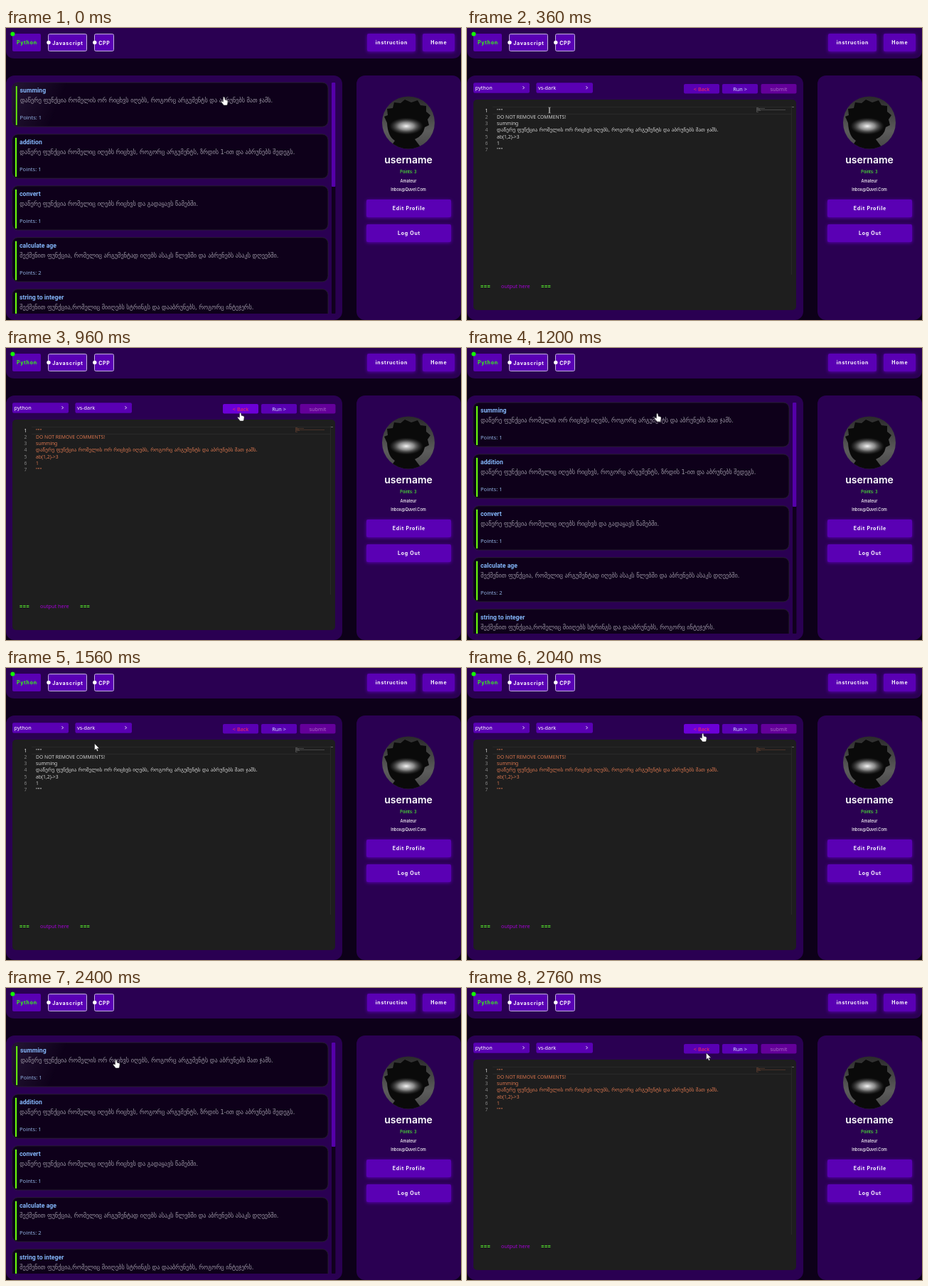
Animation of 640 by 412 pixels, one loop 2.88 s. Source, as an HTML page:

```html
<!DOCTYPE html>
<html lang="en">
<head>
<meta charset="utf-8">
<title>Coding exercises</title>
<style>
html, body { margin: 0; width: 100%; height: 100%; overflow: hidden; background: #0d0019; }
svg { display: block; width: 640px; height: 412px; }
text { font-family: "Noto Sans", "DejaVu Sans", sans-serif; white-space: pre; }
.panel { fill: #2a0052; }
.btn { fill: #5a00b4; }
.glow { filter: drop-shadow(0 1px 2.5px #5a00b4); }
.lined { stroke: #c4b2de; stroke-width: 1; }
.label { font: 700 7px Inter, sans-serif; letter-spacing: .75px; fill: #fff; }
.mid { text-anchor: middle; }
.name { font: 600 14px Inter, sans-serif; fill: #fff; }
.title { font: 600 8.7px Roboto, sans-serif; fill: #83b5f8; }
.desc { font: 8.2px "DejaVu Sans", sans-serif; fill: #9a95a3; }
.points { font-size: 7.6px; fill: #90b0e0; }
.small { font: 500 5.6px Inter, sans-serif; fill: #fff; }
.tool { font-size: 7.3px; fill: #fff; }
.rule { font: 700 7.8px "Noto Sans Mono", monospace; fill: #5cff30; }
.code { font: 6.8px "Noto Sans", sans-serif; }
.geo { font: 7.2px "DejaVu Sans", sans-serif; }

.list, .editor, .hand, .arrow, .beam, .hot, .src, .pointer, .hover, .sheen {
  animation: 2880ms step-end infinite;
}
.list { animation-name: list; }
.editor { animation-name: editor; }
.src { animation-name: tint; }
.hot { animation-name: hot; }
.hand { animation-name: hand; }
.beam { animation-name: beam; }
.arrow { animation-name: arrow; }
.pointer { animation-name: move; }
.hover { animation-name: tilt; }
.sheen { animation-name: sheen; }

@keyframes list {
  0%, 37.5%, 75% { visibility: visible; }
  12.5%, 54.16%, 87.5% { visibility: hidden; }
}
@keyframes editor {
  0%, 37.5%, 75% { visibility: hidden; }
  12.5%, 54.16%, 87.5% { visibility: visible; }
}
@keyframes tint {
  0%, 54.16%, 87.5% { fill: #d4d4d4; }
  20.83%, 62.5%, 91.66% { fill: #d9764f; }
}
@keyframes hot {
  0%, 37.5%, 75% { fill: #5a00b4; }
  33.33%, 70.83% { fill: #6c00d8; }
}
@keyframes hand {
  0%, 33.33%, 70.83% { visibility: visible; }
  12.5%, 54.16%, 87.5% { visibility: hidden; }
}
@keyframes beam {
  0%, 29.16%, 54.16%, 66.66%, 95.83% { visibility: hidden; }
  12.5%, 58.33%, 87.5% { visibility: visible; }
}
@keyframes arrow {
  0%, 33.33%, 58.33%, 70.83% { visibility: hidden; }
  29.16%, 54.16%, 66.66%, 95.83% { visibility: visible; }
}
@keyframes move {
  0% { transform: translate(307px, 103px); animation-timing-function: steps(3); }
  12.5% { transform: translate(116px, 116px); }
  16.66% { transform: translate(101px, 118px); }
  20.83% { transform: translate(112px, 117px); animation-timing-function: steps(3); }
  33.33% { transform: translate(330px, 97px); animation-timing-function: steps(2); }
  41.66% { transform: translate(268px, 98px); animation-timing-function: steps(3); }
  54.16% { transform: translate(127px, 112px); }
  58.33% { transform: translate(130px, 113px); animation-timing-function: steps(3); }
  70.83% { transform: translate(332px, 98px); animation-timing-function: steps(3); }
  83.33% { transform: translate(155px, 107px); animation-timing-function: steps(2); }
  91.66% { transform: translate(190px, 112px); }
  95.83%, 100% { transform: translate(339px, 97px); }
}
@keyframes tilt {
  0%, 45.83% { transform: translate(.6px, 0); }
  4.16%, 50%, 83.33% { transform: translate(1.1px, 0); }
  37.5%, 75% { transform: none; }
}
@keyframes sheen {
  0%, 45.83%, 79.16% { opacity: 1; }
  37.5%, 75% { opacity: 0; }
}
</style>
</head>
<body>
<svg viewBox="0 0 640 412">
  <defs>
    <linearGradient id="shine" gradientUnits="userSpaceOnUse" x1="9" y1="77" x2="75" y2="105">
      <stop stop-color="#2e1f40" stop-opacity=".7"/>
      <stop offset="1" stop-color="#2e1f40" stop-opacity="0"/>
    </linearGradient>
    <linearGradient id="wall" x2="0" y2="1">
      <stop stop-color="#2a2a2a"/><stop offset=".65" stop-color="#5c5c5c"/><stop offset="1" stop-color="#444"/>
    </linearGradient>
    <radialGradient id="light">
      <stop stop-color="#f4f4f4"/><stop offset=".45" stop-color="#aaa" stop-opacity=".8"/>
      <stop offset="1" stop-color="#555" stop-opacity="0"/>
    </radialGradient>
    <clipPath id="face"><circle cx="566" cy="133.5" r="37"/></clipPath>
    <clipPath id="scroll"><path d="M0 70H470V403H0z"/></clipPath>
  </defs>
  <path class="panel" d="M0 0H640V31Q640 43 628 43H12Q0 43 0 31z"/>
  <rect class="panel" y="67" width="473" height="345" rx="12"/>
  <rect class="panel" x="493" y="67" width="147" height="345" rx="12"/>
  <g id="frame"></g>
  <g clip-path="url(#face)">
    <path fill="url(#wall)" d="M528 96h76v76h-76z"/>
    <path fill="#0a0a0a" d="M536 134l-4-9 5-2-1-9 8-1 2-8 9 1 6-5 9 4 9-3 4 7 8 1v8l6 5-4 6 2 8-6 3q-2 12-14 17l12 16h-50l10-14q-10-6-11-25z"/>
    <ellipse cx="563" cy="138.500" rx="24" ry="12" fill="url(#light)"/>
  </g>
  <g class="list" id="list" clip-path="url(#scroll)"></g>
  <g class="editor" id="editor"></g>
  <g class="pointer">
    <g class="hand">
      <path d="M-1.3-5.2q1.2-1.1 2 .3l.4 3.1 3 .8q1.2.4 1 2L4.500 4.800 3.700 6H-.7l-3.500-4.500q-.5-1.500 1.200-1.200l1.300 1z" fill="#fff" stroke="#222" stroke-width=".5"/>
    </g>
    <path class="arrow" d="M-2.500-5.500v9.500l2.200-2 1.500 3.500 1.600-.7-1.500-3.400h3z" fill="#fff" stroke="#111" stroke-width=".5"/>
    <path class="beam" d="M-1.500-4q1.500 0 1.500 1v6q0 1-1.500 1M1.500-4q-1.500 0-1.500 1v6q0 1 1.500 1" fill="none" stroke="#ccc" stroke-width=".8"/>
  </g>
</svg>
<script>
const put = (id, parts) => document.getElementById(id).innerHTML = parts.join('');
const rect = (x, y, w, h, cls = '', rx = 2, more = '') =>
  `<rect x="${x}" y="${y}" width="${w}" height="${h}" rx="${rx}" class="${cls}" ${more}/>`;
const text = (x, y, str, cls, fill) =>
  `<text x="${x}" y="${y}" class="${cls}"${fill ? ` style="fill:${fill}"` : ''}>${str}</text>`;
const dot = (x, y, r, fill) => `<circle cx="${x}" cy="${y}" r="${r}" fill="${fill}"/>`;
const button = (x, y, w, str, cls, fill, h = 25) =>
  rect(x, y, w, h, 'btn ' + cls) + text(x + w / 2 + .4, y + 15.1, str, 'label mid', fill);

put('frame', [
  button(9, 8, 40, 'Python', '', '#36ff12'),
  button(59.5, 8.5, 54, 'Javascript', 'lined', '', 24),
  button(124.5, 8.5, 27, 'CPP', 'lined', '', 24),
  dot(9.4, 8.4, 3, '#1f0'), dot(60, 20.4, 2.7, '#fff'), dot(124.8, 20.4, 2.7, '#fff'),
  button(508, 8, 68, 'instruction', 'glow'),
  button(586, 8, 45, 'Home', 'glow'),
  button(507, 242, 119, 'Edit Profile', 'glow'),
  button(507, 277, 119, 'Log Out', 'glow'),
  text(566, 190.5, 'username', 'name mid'),
  text(566, 204.7, 'Points: 3', 'small mid', '#4dff30'),
  text(566, 217.8, 'Amateur', 'small mid'),
  text(566, 230.4, 'Inbox@Quvel.Com', 'small mid')
]);

const sum = 'დაწერე ფუნქცია რომელის ორ რიცხვს იღებს, როგორც არგუმენტს და აბრუნებს მათ ჯამს.';
const tasks = [
  ['summing', sum, 1],
  ['addition', 'დაწერე ფუნქცია რომელიც იღებს რიცხვს, როგორც არგუმენტს, ზრდის 1-ით და აბრუნებს შედეგს.', 1],
  ['convert', 'დაწერე ფუნქცია რომელიც იღებს რიცხვს და გადაყავს წამებში.', 1],
  ['calculate age', 'შექმენით ფუნქცია, რომელიც არგუმენტად იღებს ასაკს წლებში და აბრუნებს ასაკს დღეებში.', 2],
  ['string to integer', 'შექმენით ფუნქცია,რომელიც მიიღებს სტრინგს და დააბრუნებს, როგორც ინტეჯერს.', 2]
];
const card = ([name, desc, points], i) => `<g transform="translate(0 ${i * 72.9})">` +
  rect(8.7, 77, 444.3, 62.2, '', 8, 'fill="#0e001a" stroke="#2a2430" stroke-width=".8"') +
  (i ? '<g>' : rect(9, 77.4, 443.6, 61.6, 'sheen', 8, 'fill="url(#shine)"') + '<g class="hover">') +
  rect(13, 82, 2, 55, '', 0, 'fill="#6cff0a"') +
  text(19, 91, name, 'title') + text(19.3, 105.2, desc, 'desc') +
  text(19, 129, 'Points: ' + points, 'points') + '</g></g>';
put('list', [
  ...tasks.map(card),
  rect(458, 77, 5.4, 326, '', 1, 'fill="#10001d"'),
  rect(458, 77, 5.4, 147, '', 1, 'fill="#5500aa"')
]);

const lines = ['"""', 'DO NOT REMOVE COMMENTS!', 'summing', sum, 'ab(1,2)-&gt;3', '1', '"""'];
const codeLine = (str, i) => {
  const y = 118.5 + i * 9.25;
  return `<text x="29.5" y="${y}" text-anchor="end" class="code" fill="${i ? '#858585' : '#eee'}" font-weight="${i ? 400 : 700}">${i + 1}</text>` +
    text(42, y, str, 'code src' + (str === sum ? ' geo' : ''));
};
const select = (x, w, str) => rect(x, 77.3, w, 14.4, 'btn') + text(x + 2.6, 87.2, str, 'tool') +
  `<path d="M${x + w - 9.5} 82.2l2 2-2 2" fill="none" stroke="#fff" stroke-width=".9"/>`;
const action = (x, str, cls, fill, more) =>
  rect(x, 79, 50, 13.6, cls, 2, more) + text(x + 25, 88.8, str, 'tool mid', fill);
put('editor', [
  select(9, 79, 'python'), select(97.4, 79.6, 'vs-dark'),
  action(305, '&lt; Back', 'btn hot', '#ff2d55'),
  action(359, 'Run &gt;', 'btn', '#cfe0ff'),
  action(413.5, 'submit', '', '#a863c4', 'fill="#64009a"'),
  rect(9, 101, 454, 297, '', 5, 'fill="#1e1e1e"'),
  '<path d="M36 111.5H456M36 121.5H456M456.5 110V348" stroke="#2c2c2c" stroke-width=".8"/>',
  '<path d="M457 111.5h3" stroke="#777" stroke-width=".8"/>',
  ...lines.map(codeLine),
  '<g class="src" opacity=".45">' +
    [3, 12, 5, 41, 6, 1, 3].map((w, i) => rect(407, 112.4 + i * .95, w, .5, '', 0)).join('') + '</g>',
  text(18.8, 366.8, '===', 'rule'),
  text(48, 366.8, 'output here', 'tool', '#a400d6'),
  text(104, 366.8, '===', 'rule')
]);
</script>
</body>
</html>
```
